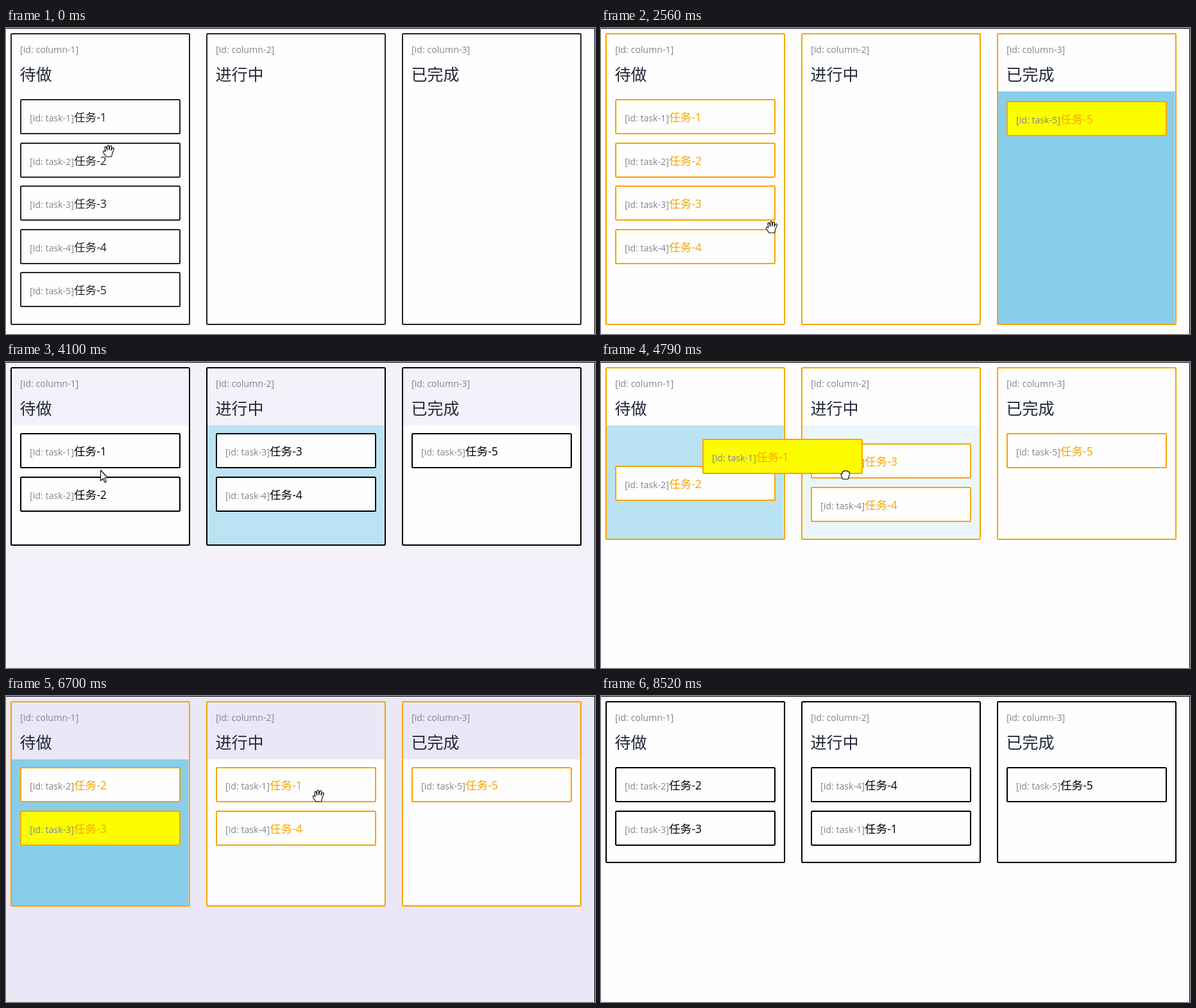
Write an HTML page that moves like this. It is 918 by 478 pixels and loops after 8.6 s.

```html
<!DOCTYPE html>
<html lang="zh">
<head>
<meta charset="utf-8">
<title>Task board</title>
<style>
  html, body { margin: 0; width: 100%; height: 100%; overflow: hidden; background: #fefefe; }
  svg { display: block; width: 918px; height: 478px; cursor: default; }
  text { font-family: "Open Sans", "Noto Sans", "Noto Sans CJK SC", "Noto Sans CJK", sans-serif; white-space: pre; }
  .id { font-size: 14.2px; fill: #80858e; }
  .title { font-size: 25px; font-weight: 300; fill: #212837; }
  .name { font-size: 17.6px; }
  .box { stroke-width: 2; }
  .cursor path { fill: #fff; stroke: #000; stroke-width: 1.1; stroke-linejoin: round; }
</style>
</head>
<body>
<svg id="stage" viewBox="0 0 918 478"></svg>
<script>
const LOOP = 8600, LAG = 80, SETTLE = 300, FADE = 300, SHIFT = 200;
const PITCH_X = 305, PITCH_Y = 67.55;
const GRIP = [178, 53], SLACK = 20;
const WHITE = [254, 254, 254], SKY = [135, 206, 235], TINT = [153, 141, 217];
const ORANGE = '#f8a500', YELLOW = '#fdfd00';

// grab and drop times in ms; target column and row
const drags = [
  { id: 5, col: 2, row: 0, grab: 1719, drop: 2368 },
  { id: 3, col: 1, row: 0, grab: 2750, drop: 3100 },
  { id: 4, col: 1, row: 1, grab: 3440, drop: 3725 },
  { id: 1, col: 1, row: 0, grab: 4330, drop: 5250 },
  { id: 3, col: 0, row: 1, grab: 5720, drop: 6420 },
  { id: 1, col: 1, row: 1, grab: 6880, drop: 7560 }
];

// pointer stops between the drags: time, x, y
const path = [
  [0, 160, 192], [1860, 665, 289], [2560, 266, 311], [4100, 147, 170],
  [5540, 497, 195], [6700, 487, 156], [8400, 580, 505]
];

const clamp = p => Math.max(0, Math.min(1, p));
const smooth = p => p * p * (3 - 2 * p);
const easeOut = p => 1 - (1 - p) ** 2;
const mix = (a, b, p) => a.map((v, i) => v + (b[i] - v) * p);
const rgb = c => `rgb(${c.map(Math.round)})`;
const slotPos = ([col, row]) => [22 + PITCH_X * col, Math.round(111 + PITCH_Y * row)];

// value of a list of [time, value, duration] transitions at time t
function valueAt(events, t) {
  let v = events[0][1];
  for (let i = 1; i < events.length && events[i][0] <= t; i++) {
    const [start, goal, dur] = events[i];
    const stop = i + 1 < events.length ? Math.min(t, events[i + 1][0]) : t;
    v = mix(v, goal, dur ? easeOut(clamp((stop - start) / dur)) : 1);
  }
  return v;
}

function pointer(t) {
  const i = path.findIndex(k => k[0] > t);
  if (i < 0) return path[path.length - 1].slice(1);
  const a = path[i - 1], b = path[i];
  return mix(a.slice(1), b.slice(1), smooth((t - a[0]) / (b[0] - a[0])));
}

function heldPos(d, t) {
  const a = pointer(d.grab), b = pointer(t);
  return d.home.map((v, i) => v + b[i] - a[i]);
}

function dragPos(d, t) {
  const held = heldPos(d, Math.max(d.grab, Math.min(t, d.drop) - LAG));
  return mix(held, d.target, easeOut(clamp((t - d.drop) / SETTLE)));
}

// does the centre of a held task lie inside a column?
function inColumn(d, t, col) {
  const x = heldPos(d, t)[0] + 125 - 7 - PITCH_X * col;
  return x >= 0 && x < 280;
}

function firstTime(d, test) {
  let t = d.grab;
  while (t < d.drop && !test(t)) t += 5;
  return t;
}

// play the drags through once to collect every transition
const lists = [[1, 2, 3, 4, 5], [], []];
const listFill = lists.map(() => [[0, WHITE]]);
const backdrop = [[0, WHITE]];
const rows = [[0, [5]]];
const slots = {};
lists[0].forEach((id, row) => { slots[id] = [[0, [0, row]]]; });
const longest = () => Math.max(...lists.map(l => l.length));

for (const d of drags) {
  const { id, col, row } = d;
  const from = lists.findIndex(l => l.includes(id));
  const homeRow = lists[from].indexOf(id);
  const before = longest();
  d.end = d.drop + SETTLE;
  d.home = slotPos([from, homeRow]);
  d.target = slotPos([col, row]);

  const grip = d.home.map((v, i) => v + GRIP[i]);
  const release = [d.target[0] + GRIP[0], d.target[1] + GRIP[1] + SLACK];
  path.push([d.grab, ...grip], [d.drop - 100, ...release], [d.drop, ...release]);
  path.sort((a, b) => a[0] - b[0]);

  const moved = from !== col;
  const enter = firstTime(d, t => moved ? inColumn(d, t, col)
    : Math.abs(heldPos(d, t)[1] - d.target[1]) < PITCH_Y / 2);
  listFill[from].push([d.grab, SKY, FADE]);
  if (moved) {
    listFill[from].push([firstTime(d, t => !inColumn(d, t, from)), WHITE, FADE]);
    listFill[col].push([enter, SKY, FADE]);
  }
  listFill[col].push([d.end, WHITE, FADE]);
  backdrop.push([enter, mix(WHITE, TINT, row / 5), FADE], [d.end, WHITE, FADE]);

  lists[from].splice(homeRow, 1);
  lists[col].splice(row, 0, id);
  lists.forEach((list, c) => list.forEach((other, r) => {
    const last = slots[other][slots[other].length - 1][1];
    if (other === id) slots[id].push([d.end, [c, r], 0]);
    else if (last[1] !== r) slots[other].push([enter, [c, r], SHIFT]);
  }));
  rows.push([enter, [Math.max(before, longest())], SHIFT], [d.end, [longest()], SHIFT]);
}

const stage = document.getElementById('stage');
function set(el, attrs) {
  for (const k in attrs) el.setAttribute(k, attrs[k]);
}
function add(parent, tag, attrs, text) {
  const el = document.createElementNS('http://www.w3.org/2000/svg', tag);
  set(el, attrs);
  if (text) el.textContent = text;
  return parent.appendChild(el);
}

const page = add(stage, 'rect', { width: 918, height: 478 });
const columns = ['待做', '进行中', '已完成'].map((title, i) => {
  const g = add(stage, 'g', { transform: `translate(${PITCH_X * i} 0)` });
  const list = add(g, 'rect', { x: 9, y: 99, width: 275.5 });
  const frame = add(g, 'rect', { class: 'box', x: 8, y: 9, width: 278, rx: 1.5, fill: 'none' });
  add(g, 'text', { class: 'id', x: 22, y: 39 }, `[id: column-${i + 1}]`);
  add(g, 'text', { class: 'title', x: 21.5, y: 82 }, title);
  return { list, frame };
});
const taskLayer = add(stage, 'g', {});
const tasks = [1, 2, 3, 4, 5].map(id => {
  const g = add(taskLayer, 'g', {});
  const box = add(g, 'rect', { class: 'box', x: 1, y: 1, width: 248, height: 53, rx: 1.5 });
  add(g, 'text', { class: 'id', x: 15, y: 35 }, `[id: task-${id}]`);
  const name = add(g, 'text', { class: 'name', x: 84, y: 35 }, `任务-${id}`);
  return { id, g, box, name };
});
add(stage, 'path', { d: 'M0 .5H917.5V478', fill: 'none', stroke: '#000' });

const cursor = add(stage, 'g', { class: 'cursor' });
const cursorShape = add(cursor, 'path', {});
const shapes = {
  open: 'M-4 9L-8 3C-10 0-7-1-5 1L-6-5C-6-7.5-3.8-7.5-3.3-5L-2.3-1L-2.2-7.5C-2-9.5 .3-9.5 .5-7.5L.8-1.5L2-7C2.5-9 5-8.5 4.6-6.3L4-1L6-4.3C7.3-6 9-4.6 8.2-2.6L5.6 4L4.5 9Z',
  closed: 'M-4 7L-6.5 2C-8-1-5.5-2-5-1L-4.6-4C-4-6-2-6-1.6-5C-1-7 1.2-7 1.6-5.2C2.4-6.5 4.2-6 4.4-4C5.5-5 7-4 6.6-2L5.5 3L4 7Z',
  arrow: 'M.5-1V15.5L4.3 12L7 18L9.3 17L6.7 11H11.8Z'
};

function draw(t) {
  const drag = drags.find(d => t >= d.grab && t < d.end);
  const ink = drag ? ORANGE : t < drags[0].grab ? '#212529' : '#000';
  const bottom = Math.round(126.2 + PITCH_Y * valueAt(rows, t)[0]);
  const [px, py] = pointer(t);
  let over = false;

  set(page, { fill: rgb(valueAt(backdrop, t)) });
  columns.forEach((c, i) => {
    set(c.list, { height: bottom - 101, fill: rgb(valueAt(listFill[i], t)) });
    set(c.frame, { height: bottom - 10, stroke: ink });
  });

  for (const task of tasks) {
    const active = drag && drag.id === task.id;
    const [x, y] = active ? dragPos(drag, t) : slotPos(valueAt(slots[task.id], t));
    set(task.g, { transform: `translate(${Math.round(x)} ${Math.round(y)})` });
    set(task.box, { fill: active ? YELLOW : rgb(WHITE), stroke: ink });
    set(task.name, { fill: ink });
    if (active && taskLayer.lastChild !== task.g) taskLayer.appendChild(task.g);
    if (px >= x && px <= x + 250 && py >= y - 5 && py <= y + 55) over = true;
  }

  const shape = drag && t < drag.drop ? 'closed' : over ? 'open' : 'arrow';
  set(cursorShape, { d: shapes[shape] });
  set(cursor, { transform: `translate(${Math.round(px)} ${Math.round(py)})` });
}

const began = performance.now();
function tick() {
  draw((performance.now() - began) % LOOP);
  requestAnimationFrame(tick);
}
tick();
</script>
</body>
</html>
```
